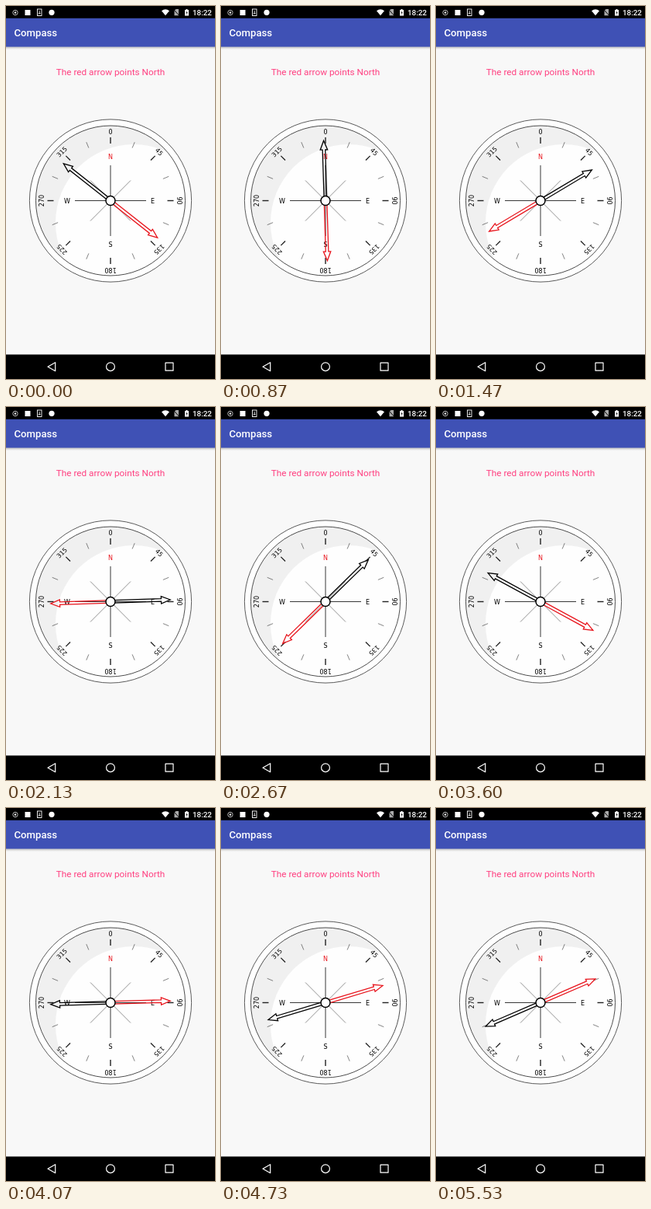
Animation of 270x480 px, one loop 5590 ms. Source, as an HTML page:

```html
<!DOCTYPE html>
<html lang="en">
<head>
<meta charset="utf-8">
<title>Compass</title>
<style>
  html, body { margin: 0; width: 100%; height: 100%; overflow: hidden; background: #f8f8f8; }
  svg { display: block; width: 270px; height: 480px; font-family: Roboto, sans-serif; }
  .dial { font: 8px "DejaVu Sans", sans-serif; text-anchor: middle; }
  .line { fill: none; stroke: #222; }
</style>
</head>
<body>
<svg viewBox="0 0 270 480">
  <defs>
    <linearGradient id="shadow" x2="0" y2="1">
      <stop stop-color="#bbb"/><stop offset="1" stop-color="#f8f8f8"/>
    </linearGradient>
    <clipPath id="face"><circle r="96.5"/></clipPath>
    <path id="arrow" d="M-1.8-5V-65.5H-4.7L0-77.2L4.7-65.5H1.8V-5" fill="none" stroke-width="1.3"/>
  </defs>

  <rect width="270" height="480" fill="#f8f8f8"/>
  <rect y="52" width="270" height="4" fill="url(#shadow)"/>
  <rect y="15" width="270" height="37.5" fill="#3f51b5"/>
  <rect width="270" height="15.75" fill="#000"/>
  <rect y="448.5" width="270" height="31.5" fill="#000"/>

  <!-- status bar -->
  <g fill="#fff">
    <circle cx="12" cy="8.5" r="3.2" fill="none" stroke="#bbb"/>
    <circle cx="12" cy="8.5" r="1.2"/>
    <rect x="24.5" y="5" width="7" height="7"/>
    <rect x="40.5" y="4" width="5.5" height="8.5" fill="none" stroke="#fff" stroke-width=".9"/>
    <path d="M43.2 6v4M41.8 9.5h2.8" stroke="#fff" stroke-width=".8"/>
    <circle cx="59" cy="8.3" r="3.6"/>
    <path d="M201 6.2Q206 2.2 211 6.2L206 12.3Z"/>
    <path d="M217.5 6L219.5 4H223V12.3H217.5Z" fill="#aaa"/>
    <path d="M216.5 4.5L224 12.5" stroke="#000"/>
    <path d="M231 5H232.5V4H234.5V5H236V12.5H231Z"/>
    <path d="M234 6L232.4 9H233.5L233 11.4L234.8 8.2H233.6Z" fill="#000"/>
    <text x="241" y="11.8" font-size="9.8" font-weight="500">18:22</text>
    <text x="10.4" y="39" font-size="13.2" font-weight="500">Compass</text>
  </g>
  <text x="135" y="88.8" font-size="11.8" fill="#ff4081" text-anchor="middle">The red arrow points North</text>

  <!-- navigation bar -->
  <g fill="none" stroke="#fff" stroke-width="1.2" stroke-linejoin="round">
    <path d="M54 464.2L63.7 458.7V469.7Z"/>
    <circle cx="135" cy="464.2" r="5.4"/>
    <rect x="206" y="459.2" width="10" height="10"/>
  </g>

  <g transform="translate(135 250.5)">
    <circle r="104.6" fill="#fefefe" stroke="#333" stroke-width=".8"/>
    <circle r="96.5" fill="#f0f0f0"/>
    <circle cx="30" cy="28.5" r="101" fill="#fefefe" clip-path="url(#face)"/>
    <circle r="96.5" class="line" stroke-width=".8"/>
    <g id="marks"></g>
    <path class="line" d="M0-45.5V45.5M-46 0H46" stroke-width=".9"/>
    <path class="line" d="M-26-26L26 26M-26 26L26-26" stroke-width=".5"/>
    <g id="needle">
      <use href="#arrow" stroke="#e8141c"/>
      <use href="#arrow" stroke="#000" transform="rotate(180)"/>
    </g>
    <circle r="6" fill="#fff" stroke="#000" stroke-width="1.5"/>
  </g>
</svg>
<script>
const LOOP = 5590, STEP = 200 / 3;
// [time in ms, heading of the red arrow in degrees]
const keys = [
  [0, 128.2], [600, 160], [870, 178.5], [1200, 215], [1800, 264],
  [2130, 268.2], [2400, 251], [3000, 192], [3130, 178.5], [3600, 118.5],
  [4070, 88.2], [4200, 84.5], [4730, 73.4], [5530, 66.7]
];

function slope(i) {
  const a = keys[Math.max(i - 1, 0)], b = keys[Math.min(i + 1, keys.length - 1)];
  return (b[1] - a[1]) / (b[0] - a[0]);
}

// Smooth cubic curve through the keys
function heading(t) {
  let i = 0;
  while (i < keys.length - 2 && t > keys[i + 1][0]) i++;
  const [t0, a] = keys[i], [t1, b] = keys[i + 1];
  const d = t1 - t0, u = Math.min((t - t0) / d, 1), v = 1 - u;
  return v * v * (1 + 2 * u) * a + u * u * (3 - 2 * u) * b
    + d * u * v * (v * slope(i) - u * slope(i + 1));
}

function drawMarks() {
  let out = "";
  for (let a = 0; a < 360; a += 22.5) {
    const major = a % 45 === 0;
    out += `<g transform="rotate(${a})"><path class="line" d="M0-73.5V-81.5" stroke-width="${major ? 1.4 : .5}"/>`;
    if (major) out += `<text class="dial" y="-86">${a}</text>`;
    out += "</g>";
  }
  for (const [name, x, y] of [["N", 0, -57], ["E", 54.5, 0], ["S", 0, 56], ["W", -56, 0]])
    out += `<text class="dial" x="${x}" y="${y + 3}" fill="${name === "N" ? "#e8141c" : "#000"}">${name}</text>`;
  document.getElementById("marks").innerHTML = out;
}

const needle = document.getElementById("needle");
function frame() {
  const step = Math.floor((performance.now() % LOOP + 4) / STEP);
  needle.setAttribute("transform", `rotate(${heading(step * STEP).toFixed(2)})`);
  requestAnimationFrame(frame);
}

drawMarks();
frame();
</script>
</body>
</html>
```
